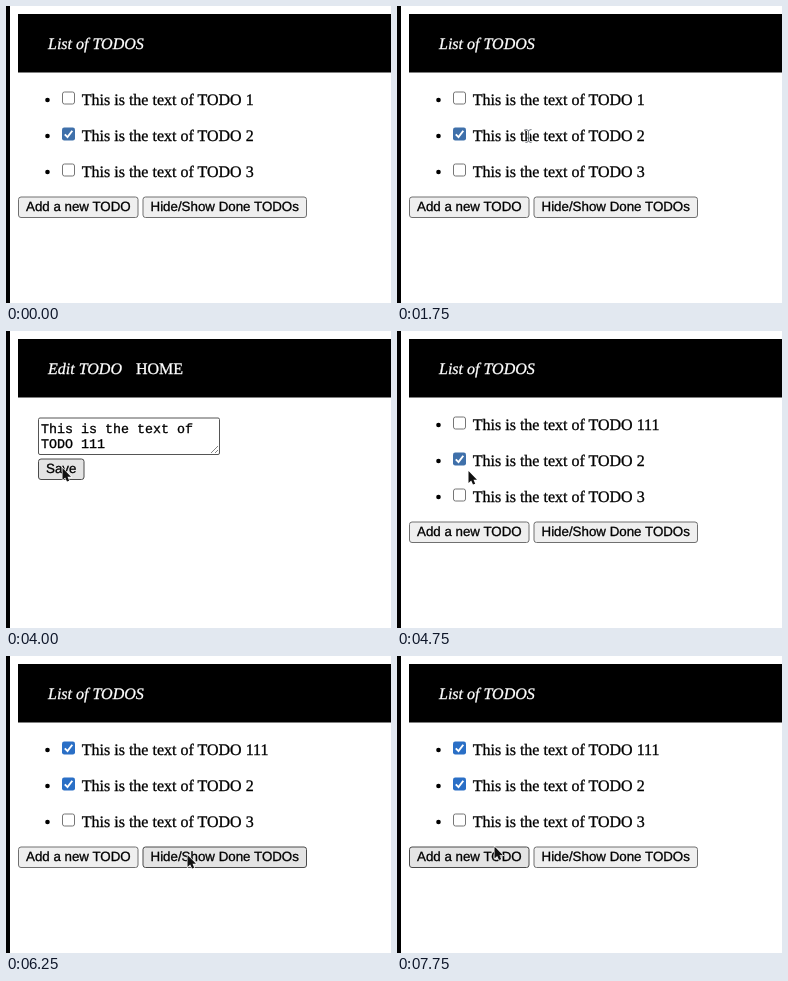
Animation, 385 px wide and 297 px high, one loop 8000 ms. Source, as an HTML page:

```html
<!DOCTYPE html>
<html lang="en">
<head>
<meta charset="utf-8">
<title>Todo list demo</title>
<style>
html, body { margin: 0; width: 100%; height: 100%; overflow: hidden; background: #fff; }
svg { display: block; width: 100%; height: 100%; }
text { white-space: pre; text-rendering: geometricPrecision; stroke-width: .3px; }
.serif { font: 16px "Liberation Serif", serif; }
.title { font-style: italic; }
.sans { font: 13.333px "Liberation Sans", sans-serif; }
.mono { font: 13.333px "Liberation Mono", monospace; }
</style>
</head>
<body>
<svg viewBox="0 0 385 297">
  <rect width="385" height="297" fill="#fff"/>
  <path d="M0 0H4V297H0ZM12 8H385V66.5H12Z"/>
  <g id="page"></g>
  <g id="pointer"></g>
</svg>
<script>
const LOOP = 8000, ROW = 36, TOP = 82;
const page = document.getElementById('page');
const pointer = document.getElementById('pointer');

// Each scene holds until the next one: time, screen, pointer kind, x, y, extras
const scenes = [
  { t: 0 },
  { t: 250, cur: 'arrow', x: 181, y: 198, hover: 'hide' },
  { t: 750, cur: 'arrow', x: 181, y: 198, hidden: true },
  { t: 1000, cur: 'arrow', x: 182, y: 166, hidden: true, hover: 'hide' },
  { t: 1250, cur: 'arrow', x: 182, y: 166 },
  { t: 1500, cur: 'beam', x: 150, y: 140 },
  { t: 1750, cur: 'beam', x: 131.5, y: 130 },
  { t: 2250, cur: 'beam', x: 138, y: 97 },
  { t: 2500, edit: true, cur: 'beam', x: 138, y: 97 },
  { t: 2750, edit: true, cur: 'beam', x: 139, y: 98 },
  { t: 3000, edit: true, cur: 'beam', x: 92, y: 113, focus: true },
  { t: 3250, edit: true, focus: true, typed: '1' },
  { t: 3500, edit: true, focus: true, typed: '11' },
  { t: 4000, edit: true, cur: 'arrow', x: 56, y: 137, typed: '11', hover: 'save' },
  { t: 4250, cur: 'arrow', x: 56, y: 137, typed: '11' },
  { t: 4500, cur: 'arrow', x: 66, y: 139, typed: '11' },
  { t: 4750, cur: 'arrow', x: 71, y: 140, typed: '11' },
  { t: 5000, cur: 'arrow', x: 69, y: 118, typed: '11' },
  { t: 5250, cur: 'arrow', x: 63, y: 94, typed: '11' },
  { t: 5500, cur: 'arrow', x: 63, y: 94, typed: '11', done: true },
  { t: 5750, cur: 'arrow', x: 92, y: 135, typed: '11', done: true },
  { t: 6000, cur: 'arrow', x: 160, y: 182, typed: '11', done: true },
  { t: 6250, cur: 'arrow', x: 181, y: 199, typed: '11', done: true, hover: 'hide' },
  { t: 6500, cur: 'arrow', x: 181, y: 199, typed: '11', done: true, hidden: true },
  { t: 6750, cur: 'arrow', x: 182, y: 187, typed: '11', done: true, hidden: true },
  { t: 7000, cur: 'arrow', x: 186, y: 155, typed: '11', done: true, hidden: true },
  { t: 7250, cur: 'arrow', x: 187, y: 138, typed: '11', done: true, hidden: true },
  { t: 7500, cur: 'arrow', x: 187, y: 131, typed: '11', done: true },
  { t: 7750, cur: 'arrow', x: 97, y: 190.5, typed: '11', done: true, hover: 'add' }
];

const text = (x, y, s, cls, fill = '#000') =>
  `<text x="${x}" y="${y}" class="${cls}" fill="${fill}" stroke="${fill}">${s}</text>`;

const button = (x, y, w, label, hot) =>
  `<rect x="${x + .5}" y="${y + 1}" width="${w - 1}" height="20.5" rx="2.5"
    fill="${hot ? '#e4e4e4' : '#efefef'}" stroke="${hot ? '#4a4a4a' : '#707070'}"/>` +
  text(x + 8, y + 15.3, label, 'sans');

function checkbox(x, y, on, blue) {
  if (!on) return `<rect x="${x + .5}" y="${y + .5}" width="12" height="12" rx="2"
    fill="#fff" stroke="#767676"/>`;
  return `<rect x="${x}" y="${y}" width="13" height="13" rx="2.2" fill="${blue}"/>
    <path d="M${x + 2.8} ${y + 6.8}l2.7 2.8 4.8-6.4" fill="none" stroke="#fff" stroke-width="1.9"/>`;
}

function listScreen(s) {
  const blue = s.done ? '#2a6fc6' : '#3f70aa';
  const items = [
    { name: 'TODO 1' + (s.typed || ''), on: s.done },
    { name: 'TODO 2', on: true },
    { name: 'TODO 3', on: false }
  ].filter(item => !(s.hidden && item.on));
  const rows = items.map((item, i) => {
    const y = TOP + i * ROW;
    return `<circle cx="41.5" cy="${y + 12}" r="2.3"/>` +
      checkbox(56, y + 3.5, item.on, blue) +
      text(75.8, y + 16.5, 'This is the text of ' + item.name, 'serif');
  });
  const y = TOP + items.length * ROW;
  return text(42, 42.5, 'List of TODOS', 'serif title', '#fff') + rows.join('') +
    button(12, y, 120.5, 'Add a new TODO', s.hover === 'add') +
    button(136.5, y, 164.5, 'Hide/Show Done TODOs', s.hover === 'hide');
}

function editScreen(s) {
  const typed = s.typed || '';
  const caret = s.focus
    ? `<path d="M${83.5 + typed.length * 8} 106V120" stroke="#000"/>` : '';
  return text(42, 42.5, 'Edit TODO', 'serif title', '#fff') +
    text(130, 42.5, 'HOME', 'serif', '#fff') +
    `<rect x="32.5" y="87" width="181" height="36.5" rx="1.5" fill="#fff"
      stroke="${s.focus ? '#101010' : '#555'}" stroke-width="${s.focus ? 2 : 1}"/>
    <path d="M205 122l7-7M209 122l3-3" stroke="#777" stroke-width=".9"/>` +
    text(35, 101.5, 'This is the text of', 'mono') +
    text(35, 117, 'TODO 1' + typed, 'mono') + caret +
    button(32, 127, 46.5, 'Save', s.hover === 'save');
}

const cursors = {
  arrow: `<path d="M.5 0V12L3.2 9.6 5 13.6 7.2 12.7 5.5 8.8H9Z"
    fill="#111" stroke="#fff" stroke-width="1.2" paint-order="stroke"/>`,
  beam: ['stroke="#fff" stroke-width="2.6"', 'stroke="#70747c" stroke-width="1"'].map(a =>
    `<path d="M-3-6.5Q0-6.5 0-4.5Q0-6.5 3-6.5M0-4.5V4.5M-3 6.5Q0 6.5 0 4.5Q0 6.5 3 6.5M-1.5 2H1.5"
      fill="none" ${a}/>`).join('')
};

let shown = null;
function draw(time) {
  const s = scenes.findLast(scene => scene.t <= time);
  if (s === shown) return;
  shown = s;
  page.innerHTML = s.edit ? editScreen(s) : listScreen(s);
  pointer.innerHTML = cursors[s.cur] || '';
  pointer.setAttribute('transform', `translate(${s.x || 0} ${s.y || 0})`);
}

const start = performance.now();
function tick() {
  draw((performance.now() - start) % LOOP);
  requestAnimationFrame(tick);
}
tick();
</script>
</body>
</html>
```
